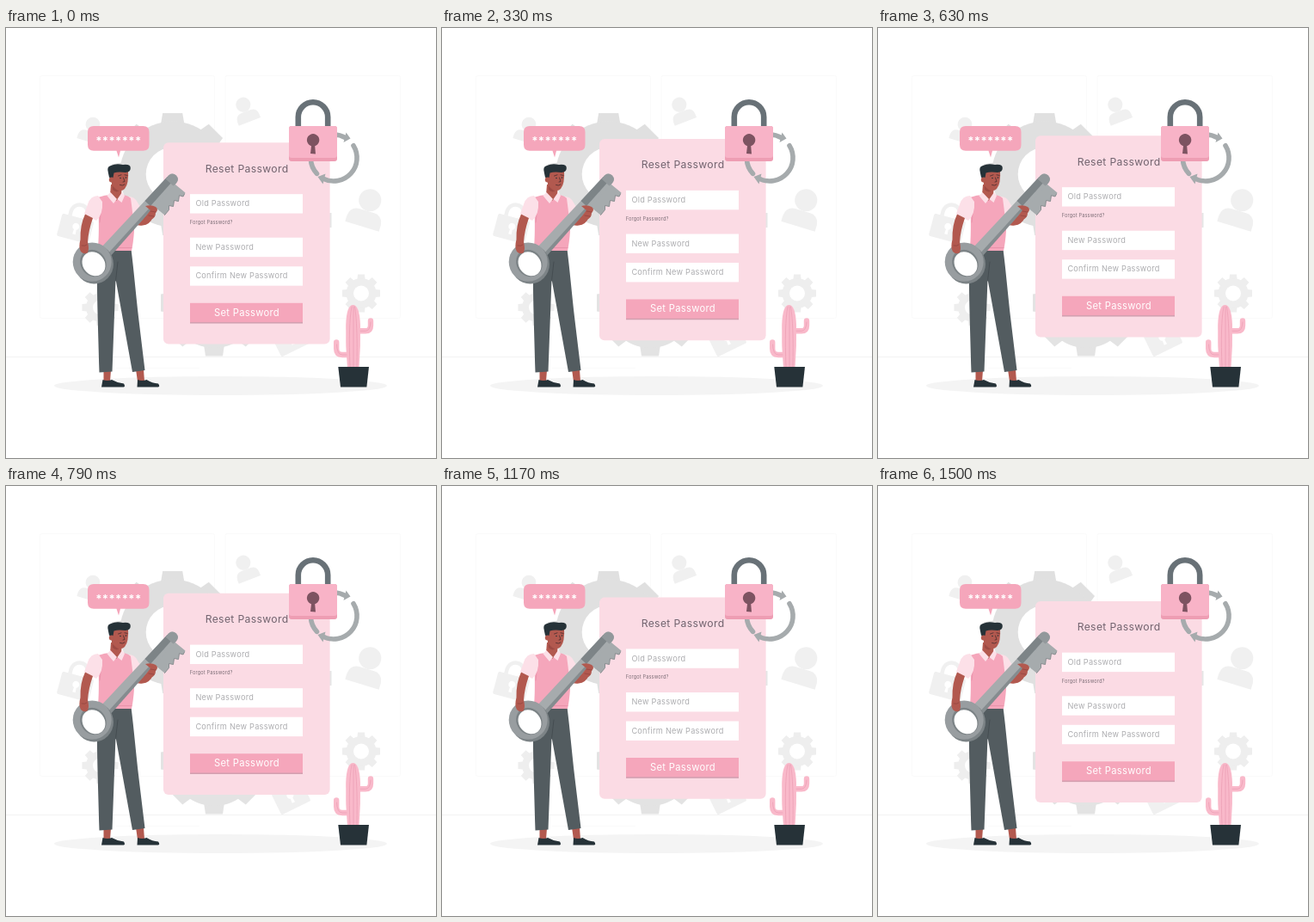
An HTML page that plays this animation: 500 by 500 pixels, repeating every 1.54 s.

```html
<!DOCTYPE html>
<html lang="en">
<head>
<meta charset="utf-8">
<title>Reset Password</title>
<style>
html, body { margin: 0; width: 100%; height: 100%; overflow: hidden; background: #fff; }
svg { display: block; width: 100vw; height: 100vh; }
text { font-family: Inter, "Open Sans", sans-serif; letter-spacing: .027em; }
.hint { font-size: 9.2px; fill: #adadb0; }
.pink { fill: #f5a6bb; }
.skin { fill: #b2594f; }
.dark { fill: #263238; }
.line { fill: none; stroke-linecap: round; stroke-linejoin: round; }
</style>
</head>
<body>
<svg viewBox="0 0 500 500">
  <defs>
    <g id="user">
      <circle r="8.6" cy="-10.5"/>
      <path d="M-13.5 10.5V6Q-13 -1.5 -6 -2H6Q13 -1.5 13.5 6V10.5Z"/>
    </g>
    <g id="lock">
      <path class="line" stroke="#f0f0f0" stroke-width="4.5" d="M-10-9V-15A10 10 0 0 1 10-15V-9" stroke-linecap="butt"/>
      <rect x="-19" y="-10" width="38" height="27" rx="2"/>
      <path fill="#fff" d="M-1.8 10L-1.4 4.6A4 4 0 1 1 1.4 4.6L1.8 10Z"/>
    </g>
  </defs>

  <g fill="none" stroke="#fafafa">
    <rect x="39.5" y="55.5" width="203" height="282" rx="2"/>
    <rect x="255" y="55.5" width="203.5" height="282" rx="2"/>
    <path stroke="#f3f3f3" d="M0 382.5H500"/>
    <path d="M128 395.5H225"/>
  </g>

  <g fill="#f0f0f0">
    <use href="#user" transform="translate(279.6 99) rotate(-21)"/>
    <use href="#user" transform="translate(418.6 215.5) rotate(17) scale(1.52)"/>
    <use href="#user" transform="translate(98 122) rotate(17) scale(.98)"/>
    <use href="#lock" transform="translate(81.5 230) rotate(15)"/>
    <use href="#lock" transform="translate(330 359) rotate(-26)"/>
  </g>
  <g id="gears"></g>
  <rect x="370" y="215" width="8.5" height="17" fill="#e6e6e6"/>
  <ellipse cx="249.5" cy="416" rx="193.5" ry="11" fill="#f4f4f4"/>

  <g id="panel">
    <rect x="183" y="133.4" width="193.6" height="234.2" rx="6" fill="#fbdbe4"/>
    <text x="231.7" y="167.7" font-size="12.2" fill="#72646f">Reset Password</text>
    <g fill="#fff">
      <rect x="214" y="193.2" width="131" height="22.4"/>
      <rect x="214" y="243.8" width="131" height="22.4"/>
      <rect x="214" y="277.3" width="131" height="22.4"/>
    </g>
    <g class="hint">
      <text x="220.4" y="207.4">Old Password</text>
      <text x="220.4" y="258">New Password</text>
      <text x="220.4" y="291.5">Confirm New Password</text>
    </g>
    <text x="213.8" y="228" font-size="5.6" fill="#7c6d76">Forgot Password?</text>
    <rect x="214" y="321" width="131" height="22.6" fill="#d3a0b0"/>
    <rect class="pink" x="214" y="319.8" width="131" height="22.2"/>
    <text x="242" y="334.6" font-size="11.2" fill="#fff">Set Password</text>
  </g>

  <g>
    <path class="line" stroke="#a6abad" stroke-width="5.6" stroke-linecap="butt" d="M361.5 169.4A27 27 0 0 1 394.5 127.5M404 136.8A27 27 0 0 1 369 175.2"/>
    <path fill="#a6abad" d="M395.5 121.5L400.5 128.6L392.5 133ZM371.5 169.5L362.5 173L368.5 181.5Z"/>
    <path class="line" stroke="#687177" stroke-width="6.6" stroke-linecap="butt" d="M339.8 116V103.5A17.2 17.2 0 0 1 374.2 103.5V116"/>
    <rect x="329" y="114" width="56" height="41" rx="3" fill="#ee9db3"/>
    <path fill="#f8b3c7" d="M332 114H382Q385 114 385 117V148Q385 151 382 151H332Q329 151 329 148V117Q329 114 332 114Z"/>
    <path fill="#7d5361" d="M354 146L355 137.2A7.2 7.2 0 1 1 359.2 137.2L360 146.5Z"/>
  </g>

  <g>
    <path fill="#f9b9ca" d="M397 395Q394.5 370 395.2 345Q396 322 403.5 322Q411 322 412 345Q412.5 370 410.5 395Z"/>
    <g class="line" stroke="#f9b9ca" stroke-width="6.4">
      <path d="M397 380H391Q384.3 380 384.2 373V365.5"/>
      <path d="M411 352.3H418Q424 352.3 424 346V340.5"/>
    </g>
    <path class="line" stroke="#eda0b5" stroke-width=".8" d="M400 394Q398 345 402 324M404 394V324M408 394Q409 345 405.5 324M396 380H391Q385 380 384.5 368M412 352.3H418Q423.5 352 424 342"/>
    <path class="dark" d="M386.3 394H422L419.4 417.5H389Z"/>
  </g>

  <g>
    <path class="skin" d="M113.5 398H122L121 411H113.5ZM151 397H160L161 411H153Z"/>
    <path class="dark" d="M112.5 409Q118 411 123 409Q130 413 137 413.5Q139 417 137 417.5H111ZM153 409Q158 411 163.5 409Q170 413 177 413.5Q179.5 417 177 417.5H152.5Z"/>
    <path fill="#535c60" d="M106.5 257H145.5C149 285 151 310 154.5 340L161.5 398L147 400L127.5 292L123.5 399.5L108.5 400.5C107 340 105 300 106.5 257Z"/>
    <path class="line" stroke="#434b50" stroke-width=".9" d="M127.5 294L130 272"/>
    <path class="skin" d="M143 214L155 222L166 217L171 220Q167 229 159 229.5Q150 231 141 222Z"/>
    <path fill="#fce0e8" d="M137 196Q149 194 153 203Q157 209 159 214L148 226L139 221Z"/>
    <path class="pink" d="M107 197Q115 194 122 194H134Q141 194 145 198Q148 220 149 236Q148 250 146 259H106.5Q109 240 107 197Z"/>
    <path class="line" stroke="#e88fa8" stroke-width=".8" d="M106.8 255.5H146M109 205Q111 214 109 226"/>
    <path fill="#fce0e8" d="M107 195Q98 195 95 205L91 216L105 224Q113 217 112 202Z"/>
    <path class="skin" d="M122 182H135L134 195L128 201L121 194Z"/>
    <path fill="#fce0e8" d="M121.5 191L129 199L125 204L117.5 195ZM135 191L129.5 199L134.5 203L138 195Z"/>
    <path class="skin" d="M122 166L142 165Q143 181 138 187Q134 191 129 187L123 182Z"/>
    <path fill="#9d4a44" d="M123.5 183Q127 188 131.5 189.3Q128 192 124 188Z"/>
    <path class="dark" d="M119 169Q116.5 161 122 160Q128 157 136 159Q145 158 144.8 163Q144.8 167.5 139 168Q130 167 125.5 168.5L124.5 174L121 175Q119.5 173 119 169Z"/>
    <circle class="skin" cx="122.8" cy="176.5" r="3"/>
    <g class="dark"><circle cx="133" cy="174.5" r=".8"/><circle cx="139.5" cy="174" r=".8"/></g>
    <path class="line" stroke="#482d2e" stroke-width=".8" d="M130.5 172L134 170.8M138 170.8L141 171.4M136.5 174L138 178.5L136 179M132.5 182.5Q135.5 184 138 182"/>
  </g>

  <g>
    <path fill="#a6abad" d="M171.5 207L194.5 180L208.5 191.5L206 196L201.5 194.7L200.5 201.5L195.5 200.5L194.5 207.5L189.5 206.5L189.5 211.5L184.5 217.5Z"/>
    <path class="line" stroke="#81888b" stroke-width=".9" d="M207.5 193L206 196L201.5 194.7L200.5 201.5L195.5 200.5L194.5 207.5L189.5 206.5L189.5 211.5L184.5 217.5"/>
    <path fill="#a6abad" d="M109 257L189.5 171Q193 168 197.5 171.5Q201.5 175.5 198 180L119 266Z"/>
    <path fill="#858c8f" d="M117 264L167.5 208.5L170.5 210L120 267Z"/>
    <path fill="#7d8487" d="M161.5 201L187.5 173L196 181L170.5 209.5Z"/>
    <path fill="#a6abad" d="M168 207L193 179L197.5 181L172 209.5Z"/>
    <path fill="#92989b" d="M189 171.5Q194 167.5 198 171.5Q202 176 198 180.5L194.5 183.5L185.5 175.5Z"/>
    <ellipse cx="102.5" cy="274.5" rx="22.5" ry="23" fill="#7c8386"/>
    <ellipse cx="100.2" cy="272" rx="22.5" ry="22.6" fill="#989da0"/>
    <ellipse cx="101.4" cy="273.4" rx="14.6" ry="16.4" fill="#7c8386" transform="rotate(-38 101.4 273.4)"/>
    <ellipse cx="102" cy="274.3" rx="12.6" ry="14.8" fill="#fff" transform="rotate(-38 102 274.3)"/>
    <path class="skin" d="M92 216.5L101 221Q96 235 95 249Q97 256 95 261Q91 264 87 260Q84 255 86.5 246Q86 229 92 216.5Z"/>
    <path class="skin" d="M162 207Q169 205 174 208Q178 211 174 215Q174 221 168 223Q161 228 158 226L164 217L168 212Z"/>
    <path class="line" stroke="#8f433e" stroke-width=".7" d="M88 253Q92 254 94 252M168 213L174 214M166 218L172 219"/>
  </g>

  <path class="pink" d="M102 114H159.5Q166.5 114 166.5 121V135.7Q166.5 142.7 159.5 142.7H133L131 150.5L128.5 142.7H102Q95 142.7 95 135.7V121Q95 114 102 114Z"/>
  <text x="130.9" y="136.2" font-size="13" font-weight="700" text-anchor="middle" fill="#fff">*******</text>
</svg>
<script>
const NS = "http://www.w3.org/2000/svg";
const gears = document.getElementById("gears");
const panel = document.getElementById("panel");

function add(tag, attrs) {
  const el = document.createElementNS(NS, tag);
  for (const k in attrs) el.setAttribute(k, attrs[k]);
  gears.append(el);
}

// Eight tapered teeth around a disc with a round hole.
function gear(cx, cy, r, outer, hole, half, fill) {
  for (let a = 0; a < 360; a += 45) {
    add("path", {
      d: `M${-half * 1.2} ${4 - r}L${-half} ${-outer}H${half}L${half * 1.2} ${4 - r}Z`,
      transform: `translate(${cx} ${cy}) rotate(${a})`, fill
    });
  }
  add("circle", { cx, cy, r, fill });
  add("circle", { cx, cy, r: hole, fill: "#fff" });
}

gear(193.7, 170, 61.5, 71, 31, 11.5, "#e0e0e0");
gear(242, 319.5, 52.5, 62, 26, 10, "#e3e3e3");
gear(413, 308.5, 17.5, 22, 9, 4, "#eeeeee");
gear(109.5, 325, 16.5, 21, 8.5, 4, "#eeeeee");

const LOOP = 1540, STEPS = 37, HALF = 18.5, RISE = 9.9;

// The panel rises and sinks at constant speed, at 24 steps a second.
function draw(now) {
  const step = Math.floor(((now + 2) % LOOP) * STEPS / LOOP);
  const phase = (step + 1) % STEPS;
  const lift = RISE * (1 - Math.abs(phase - HALF) / HALF);
  panel.setAttribute("transform", `translate(0 ${(0.5 - lift).toFixed(2)})`);
}

const start = performance.now();
function tick() {
  draw(performance.now() - start);
  requestAnimationFrame(tick);
}
tick();
</script>
</body>
</html>
```
